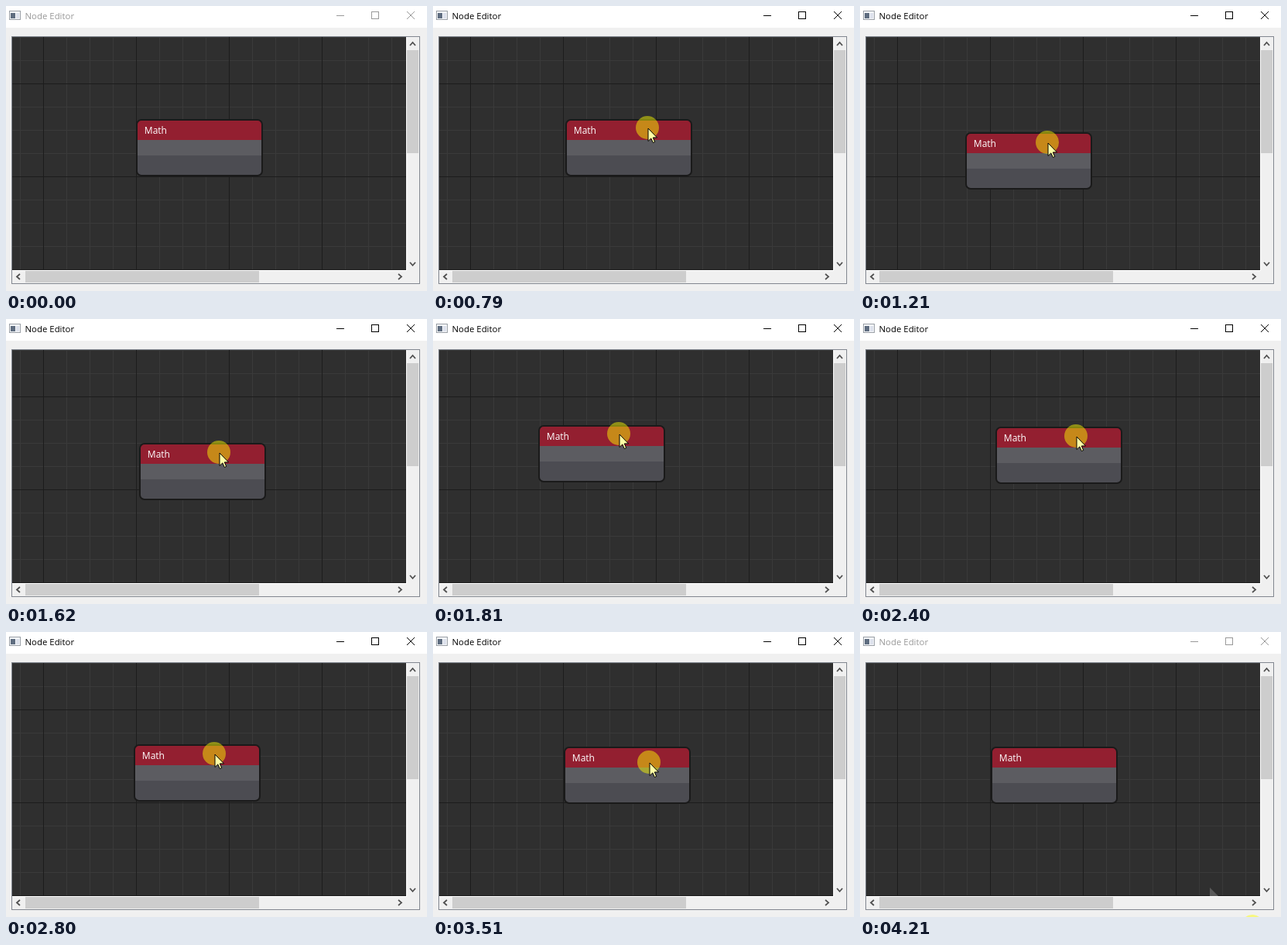
Animation, 544 px wide and 368 px high, one loop 4410 ms. Source, as an HTML page:

```html
<!DOCTYPE html>
<html lang="en">
<head>
<meta charset="utf-8">
<title>Node Editor</title>
<style>
  html, body { margin: 0; width: 100%; height: 100%; overflow: hidden; background: #f0f0f0; }
  svg { display: block; width: 544px; height: 368px; }
  text { font-family: "Open Sans", "Noto Sans", sans-serif; }
  .crisp { shape-rendering: crispEdges; }
  .line { fill: none; stroke: currentColor; }
  #caption { color: #999; }
  #caption.active { color: #000; }
</style>
</head>
<body>
<svg viewBox="0 0 544 368">
  <defs>
    <pattern id="minor" x="18" y="40" width="30" height="30" patternUnits="userSpaceOnUse">
      <path class="crisp" d="M0 0H30V1H1V30H0Z" fill="#3a3a3a"/>
    </pattern>
    <pattern id="major" x="48" y="100" width="120" height="120" patternUnits="userSpaceOnUse">
      <path class="crisp" d="M0 0H120V1H1V120H0Z" fill="#1c1c1c"/>
    </pattern>
    <clipPath id="body"><rect width="162" height="72" rx="6"/></clipPath>
  </defs>

  <!-- window -->
  <rect width="544" height="368" fill="#f0f0f0"/>
  <rect width="544" height="28" fill="#fff"/>
  <g class="crisp">
    <rect x="4" y="6" width="15" height="12" fill="#9a9fa6"/>
    <rect x="5" y="7" width="13" height="10" fill="#f4f6f8"/>
    <rect x="6" y="9" width="6" height="7" fill="#5f6d80"/>
    <rect x="13" y="9" width="4" height="7" fill="#dde1ec"/>
  </g>
  <g id="caption">
    <text x="24.5" y="17" font-size="11.4" fill="currentColor">Node Editor</text>
    <path class="line crisp" d="M427 12.5H437M472.5 7.5H481.5V16.5H472.5Z"/>
    <path class="line" d="M518 7L528 17M528 7L518 17"/>
  </g>

  <!-- view -->
  <g class="crisp">
    <rect x="7" y="39" width="528" height="320" fill="#828790"/>
    <rect x="8" y="40" width="526" height="318" fill="#f0f0f0"/>
    <rect x="8" y="40" width="510" height="302" fill="#fff"/>
    <rect x="8" y="40" width="509" height="301" fill="#2f2f2f"/>
    <rect x="8" y="40" width="509" height="301" fill="url(#minor)"/>
    <rect x="8" y="40" width="509" height="301" fill="url(#major)"/>
    <rect x="25" y="342" width="302" height="15" fill="#cdcdcd"/>
    <rect x="518" y="57" width="15" height="133" fill="#cdcdcd"/>
  </g>
  <path class="line" color="#505050" stroke-width="1.8"
    d="M18 346L14 349.5L18 353M507 346L511 349.5L507 353M522 51L525.5 47L529 51M522 331L525.5 335L529 331"/>

  <path id="trace" d="M452 330L463 341H452Z" fill="#5a5a5a"/>

  <g id="node">
    <g clip-path="url(#body)">
      <rect width="162" height="72" fill="#4c4c52"/>
      <rect width="162" height="46" fill="#5c5c61"/>
      <rect width="162" height="26" fill="#931f30"/>
    </g>
    <rect width="162" height="72" rx="6" fill="none" stroke="#1a1a1a" stroke-width="2"/>
    <text x="9.8" y="18" font-size="12" font-weight="500" fill="#fff">Math</text>
  </g>

  <g id="pointer">
    <circle r="15" fill="#ff0" fill-opacity=".47"/>
    <path d="M.5 .5V17L4.3 13.4L6.8 19L9.2 18L6.8 12.4H12Z" transform="translate(.5 .5)"
      fill="#ffffa6" stroke="#000"/>
  </g>
</svg>
<script>
  const LOOP = 4410, TICK = 100;
  const GRAB = [103.2, 11], LEAD = 0.08;
  const FOCUS = 5, PRESS = 6, RELEASE = 33, LEAVE = 39, BLUR = 42;

  // Key points of the hand: tick, x, y of the grabbed node corner
  const approach = [[0, 500, 440], [1, 299, 252], [2, 207, 191], [5, 169, 147]];
  const shake = [
    [7, 170, 147], [8, 172, 147], [9, 211, 118], [10.5, 140, 94], [12, 137, 164],
    [14, 205, 150], [16, 173, 161], [18, 137, 138], [19, 155, 123], [21, 154, 142],
    [24, 176, 140], [26, 162, 136], [28, 166, 146], [31, 167, 147], [33, 170, 149]
  ];
  const exit = [[34, 170, 149], [35, 176, 157], [38, 347, 318], [39, 369, 339], [41, 369, 339], [42, 404, 369]];
  const keys = [...approach, ...shake, ...exit];

  const $ = id => document.getElementById(id);
  const clamp = (v, lo, hi) => Math.min(hi, Math.max(lo, v));
  const place = (el, x, y) =>
    el.setAttribute("transform", `translate(${Math.round(x)} ${Math.round(y)})`);

  function slope(i, axis) {
    const a = keys[Math.max(0, i - 1)], b = keys[Math.min(keys.length - 1, i + 1)];
    return (b[axis] - a[axis]) / (b[0] - a[0]);
  }

  // Smooth cubic path through the key points
  function hand(tick) {
    const i = clamp(keys.findLastIndex(k => k[0] <= tick), 0, keys.length - 2);
    const a = keys[i], b = keys[i + 1], span = b[0] - a[0];
    const u = clamp((tick - a[0]) / span, 0, 1), v = 1 - u;
    return [1, 2].map(axis =>
      v * v * (1 + 2 * u) * a[axis] + u * u * (1 + 2 * v) * b[axis] +
      u * v * span * (v * slope(i, axis) - u * slope(i + 1, axis)));
  }

  function draw(t) {
    const tick = Math.floor((t + 10) / TICK);
    const dragging = tick > PRESS && tick < RELEASE;
    const [px, py] = hand(dragging ? tick + LEAD : tick);
    place($("node"), ...hand(clamp(tick, PRESS - 1, RELEASE)));
    place($("pointer"), px + GRAB[0], py + GRAB[1]);
    $("caption").classList.toggle("active", tick >= FOCUS && tick < BLUR);
    $("trace").style.visibility = tick >= LEAVE ? "visible" : "hidden";
  }

  let start;
  function frame(now) {
    start ??= now;
    draw((now - start) % LOOP);
    requestAnimationFrame(frame);
  }
  draw(0);
  requestAnimationFrame(frame);
</script>
</body>
</html>
```
